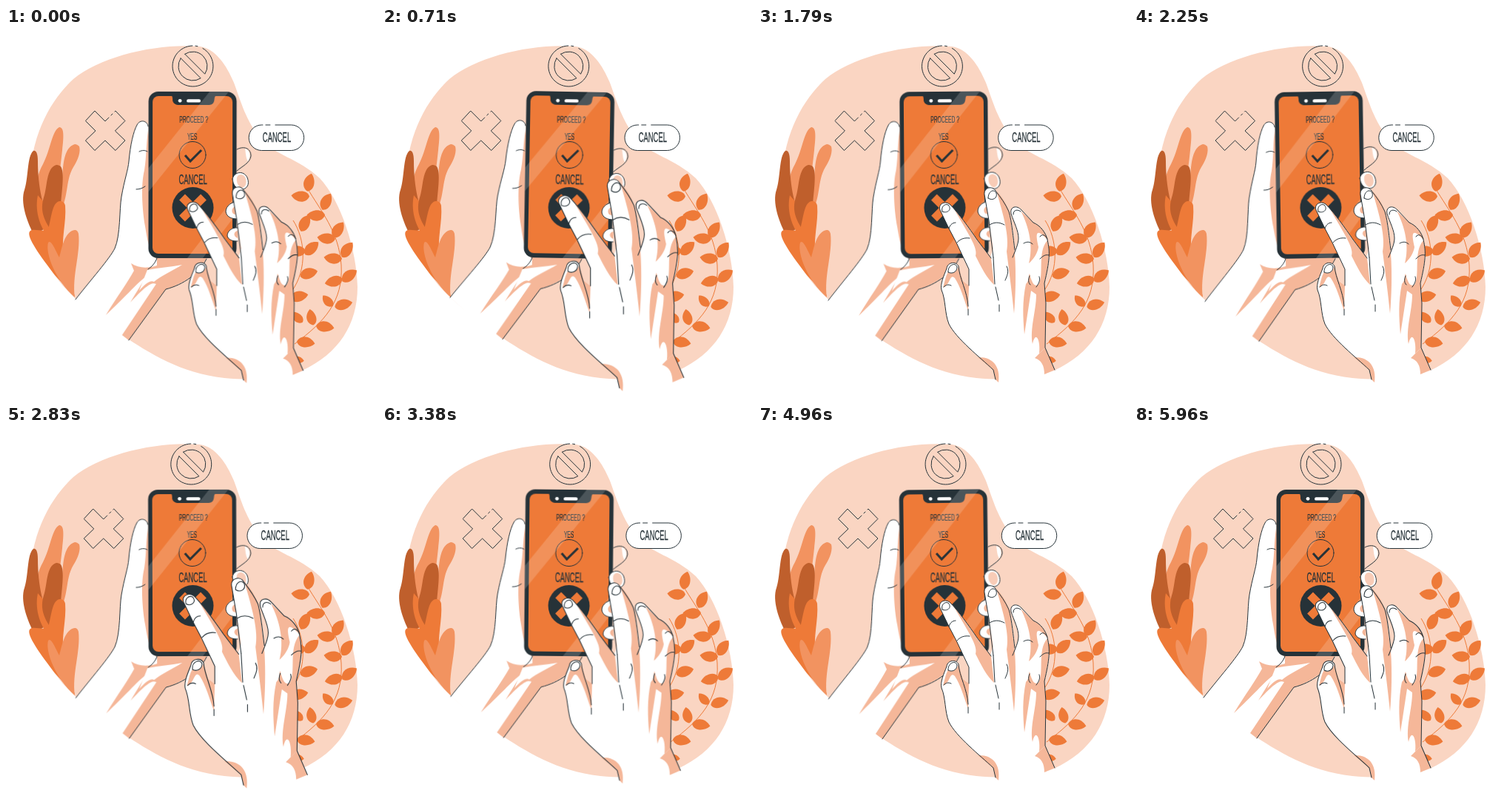
An HTML page that plays this animation: 500 px wide and 500 px high, repeating every 6 s.

```html
<!DOCTYPE html>
<html lang="en">
<head>
<meta charset="utf-8">
<title>Proceed or cancel</title>
<style>
  html, body { margin: 0; width: 100%; height: 100%; overflow: hidden; background: #fff; }
  svg { display: block; width: 100vw; height: 100vh; }

  .blob { fill: #fad5c2; }
  .orange { fill: #ee7a38; }
  .rust { fill: #bf5f2c; }
  .coral { fill: #f29360; }
  .shade { fill: #f5b799; }
  .skin { fill: #fff; }
  .dark { fill: #263238; }
  .ink { fill: none; stroke: #263238; stroke-width: 1; stroke-linecap: round; stroke-linejoin: round; }
  .skin.ink { fill: #fff; }
  .blob.ink { fill: #fad5c2; }
  .stem { fill: none; stroke: #ee7a38; stroke-width: 1; }
  .glare { fill: #fff; opacity: .17; }

  .label {
    font: 17.5px "Liberation Sans", Arial, sans-serif;
    fill: #263238; stroke: #263238; stroke-width: .3;
    text-anchor: middle;
    transform: scaleX(.54); transform-box: fill-box; transform-origin: center;
  }
  .small { font-size: 12.4px; stroke-width: .25; }

  .sway, .pulse, .shake { animation: 6s linear -.04s infinite; }
  .sway { animation-name: sway; animation-duration: 3s; transform-origin: 250px 250px; }
  .pulse { animation-name: pulse; transform-origin: 322px 344px; }
  .shake { animation-name: shake; }

  @keyframes sway {
    25% { transform: rotate(1deg); }
    75% { transform: rotate(-1deg); }
  }
  @keyframes pulse {
    0%, 30%, 40%, 60%, 100% { transform: scale(1); }
    10%, 50% { transform: scale(1.1); }
  }
  @keyframes shake {
    0%, 100% { transform: translateX(0); }
    10%, 90% { transform: translateX(-1px); }
    20%, 80% { transform: translateX(2px); }
    30%, 50%, 70% { transform: translateX(-4px); }
    40%, 60% { transform: translateX(4px); }
  }
</style>
</head>
<body>
<svg viewBox="0 0 500 500">
  <defs>
    <path id="leaf" class="orange" d="M-12 1C-9 -9 4 -11 12.500 -1C6 8 -8 10 -12 1Z"/>
    <clipPath id="case"><rect x="192.5" y="86" width="119" height="225" rx="13"/></clipPath>
  </defs>

  <path class="blob" d="M262 25C283 28 298 50 308 74C318 101 324 125 345 151C362 171 395 176 424 203C453 234 474 300 475 350C475 400 450 440 400 463C365 476 330 476 295 473C235 466 195 440 157 415C122 389 90 367 68 337C40 300 28 255 32 200C37 140 60 98 91 69C128 38 205 20 262 25Z"/>

  <!-- foliage, left -->
  <g>
    <path class="coral" d="M72 134C62 139 60 165 50 184C37 207 38 232 50 262L72 240C68 220 73 195 76 165C78 148 79 134 72 134Z"/>
    <path class="rust" d="M37 166C28 173 31 203 24 222C20 240 30 265 38 280L62 265C50 245 43 215 43 180C43 170 41 165 37 166Z"/>
    <path class="coral" d="M93 157C79 161 77 182 76 205C74 222 66 238 70 252C86 232 79 208 91 188C98 177 101 167 99 160C97 158 95 157 93 157Z"/>
    <path class="orange" d="M43 226C38 250 48 272 58 284L70 250C60 240 52 238 43 226Z"/>
    <path class="rust" d="M68 185C54 189 56 215 51 229C45 248 53 262 62 275L74 240C75 222 79 200 75 189C74 186 71 185 68 185Z"/>
    <path class="orange" d="M73 234C63 235 62 252 58 268C57 280 36 268 32 275C27 282 47 309 66 334L93 363L78 310C74 285 82 262 80 240C79 235 76 234 73 234Z"/>
    <path class="coral" d="M93 273C79 275 76 296 72 310C66 299 61 285 57 290C53 304 66 340 93 364C89 334 101 305 98 278C97 274 95 273 93 273Z"/>
  </g>

  <!-- vines, right -->
  <g>
    <path class="stem" d="M390 427C430 397 456 370 453 320C450 275 425 247 407 216"/>
    <path class="stem" d="M388 260C404 285 408 325 386 356"/>
    <use href="#leaf" transform="translate(410 209) rotate(-72)"/>
    <use href="#leaf" transform="translate(398 227) rotate(-172)"/>
    <use href="#leaf" transform="translate(433 235) rotate(-58)"/>
    <use href="#leaf" transform="translate(419 253) rotate(-175)"/>
    <use href="#leaf" transform="translate(404 264) rotate(-58)"/>
    <use href="#leaf" transform="translate(449 273) rotate(-52)"/>
    <use href="#leaf" transform="translate(433 284) rotate(-170)"/>
    <use href="#leaf" transform="translate(413 298) rotate(-38)"/>
    <use href="#leaf" transform="translate(393 301) rotate(-170)"/>
    <use href="#leaf" transform="translate(461 300) rotate(-50)"/>
    <use href="#leaf" transform="translate(442 311) rotate(-170)"/>
    <use href="#leaf" transform="translate(409 332) rotate(-12)"/>
    <use href="#leaf" transform="translate(464 335) rotate(-32)"/>
    <use href="#leaf" transform="translate(443 342) rotate(170)"/>
    <use href="#leaf" transform="translate(396 363) rotate(-8)"/>
    <use href="#leaf" transform="translate(456 374) rotate(-10)"/>
    <use href="#leaf" transform="translate(435 369) rotate(-128) scale(.8)"/>
    <use href="#leaf" transform="translate(431 404) rotate(12)"/>
    <use href="#leaf" transform="translate(413 391) rotate(-98) scale(.9)"/>
    <use href="#leaf" transform="translate(405 425) rotate(12)"/>
    <use href="#leaf" transform="translate(394 391) rotate(-130) scale(.8)"/>
    <use href="#leaf" transform="translate(394 449) rotate(10) scale(.7)"/>
  </g>

  <!-- phone and the hand that holds it -->
  <g class="sway">
    <path class="skin" d="M94 367C115 340 140 312 147 298C155 280 153 245 156 228C160 205 165 192 166 180C168 158 172 140 177 131C181 123 191 125 192 133L200 300H272C264 328 240 346 216 353L165 423L150 416Z"/>
    <path class="shade" d="M192 138C189 160 190 172 187 192C182 212 184 245 188 268C191 285 192 298 203 312L210 300Z"/>
    <path class="shade" d="M169 318C179 325 192 325 204 321V308H272C264 328 240 346 216 353L166 422L157 415L203 346C196 343 188 350 168 371C176 357 183 347 189 336C176 346 160 365 135 388C151 362 165 343 173 328Z"/>
    <path class="skin" d="M191 327C207 324 222 323 238 320C225 328 211 334 200 343C195 340 187 347 180 355Z"/>
    <path class="ink" d="M94 367C115 340 140 312 147 298C155 280 153 245 156 228C160 205 165 192 166 180C168 158 172 140 177 131C181 123 191 125 192 133M180 167C184 165 188 165 191 167M176 218C180 218 184 217 188 214M192 326C198 322 202 317 204 311M166 422L216 353C240 347 262 331 271 312"/>

    <rect class="dark" x="192.5" y="86" width="119" height="225" rx="13"/>
    <rect class="orange" x="198" y="92" width="108" height="213" rx="8"/>
    <path class="dark" d="M223 91H284C281 93 282 96 281 99C280 103 277 104 273 104H234C229 104 226 102 225 98C225 95 225 92 223 91Z"/>
    <circle class="skin" cx="235" cy="98.3" r="2.4"/>
    <rect class="skin" x="244" y="96.2" width="19" height="4.4" rx="2.2"/>
    <text class="label small" x="253.5" y="128">PROCEED ?</text>
    <text class="label small" x="251.5" y="151">YES</text>
    <circle class="ink" cx="252" cy="171.5" r="18"/>
    <path class="ink" d="M242 172L249 180L264 165" style="stroke-width:3;stroke-linecap:butt;stroke-linejoin:miter"/>
    <text class="label" x="252.5" y="211.5">CANCEL</text>
    <circle class="dark" cx="252.5" cy="243" r="28"/>
    <path d="M238 228.500L267 257.500M267 228.500L238 257.500" stroke="#ee7a38" stroke-width="11"/>
    <g clip-path="url(#case)">
      <path class="glare" d="M275 86H301L192 222V190Z"/>
      <path class="glare" d="M312 224V250L266 311H245Z"/>
    </g>

    <!-- fingertips wrapped round the edge -->
    <path class="blob ink" d="M312 164C321 159 331 162 331 173C329 183 320 186 312 193"/>
    <path class="skin" d="M323 163C330 165 331 174 327 180C324 176 324 169 323 163Z"/>
    <path class="skin ink" d="M306 204C308 194 321 192 326 202C330 212 325 218 318 218C311 217 307 213 306 204Z"/>
    <path class="shade" d="M312 202C314 196 322 197 324 204C326 212 322 216 318 216C313 213 311 208 312 202Z" opacity=".7"/>
    <path class="skin ink" d="M313 235C306 234 297 240 297 248C298 255 304 258 313 258"/>
    <path class="shade" d="M313 240C307 241 303 246 307 251L313 253Z"/>
    <path class="skin ink" d="M313 270C306 269 299 274 299 281C301 287 307 288 313 288"/>
    <path class="shade" d="M313 274C308 275 306 281 313 284Z"/>
  </g>

  <!-- tapping hand -->
  <g class="pulse">
    <path class="skin" d="M246 246C243 238 252 233 259 238C271 250 285 270 296 286L314 310L318 298L312 260L306 225C305 215 317 213 321 220C328 229 334 237 339 248C343 261 345 280 347 305L352 286C352 274 346 263 342 251C340 241 350 239 356 246L372 263C382 267 389 277 391 286C395 303 394 315 387 345L389 372L388 432L401 462L387 468L360 480H326L321 475L318 462C300 445 268 420 258 400C252 385 254 368 248 354C246 346 251 335 255 325C256 316 268 315 271 322L277 342L285 348V326L268 290L258 271Z"/>

    <g class="shade">
      <path d="M265 245C276 257 288 276 296 287L315 311L319 347C309 338 301 322 294 308C297 298 288 284 265 245Z"/>
      <path d="M322 220C333 231 341 246 342 264L347 305C349 332 348 362 346 386C343 356 339 326 336 302C340 282 332 254 322 220Z"/>
      <path d="M355 247L372 263C382 267 389 277 391 286L385 280C374 271 376 283 379 296C378 304 372 313 366 318C372 296 367 270 355 247Z"/>
      <path d="M391 287C395 303 393 318 387 345L389 372L388 432L380 440C382 421 375 408 371 427C367 407 376 382 376 360L369 355L360 414C358 390 357 370 362 346C367 341 365 335 367 332C370 344 373 350 379 347C387 334 377 303 391 287Z"/>
      <path d="M388 432L401 462L387 468C387 456 383 449 374 446Z"/>
      <path d="M297 445C317 444 328 457 325 479L321 475L318 462Z"/>
      <path d="M271 322L277 342L285 348L284 382C278 366 274 350 266 338C259 331 260 347 250 351C253 340 254 334 257 330C262 333 268 331 271 322Z"/>
    </g>

    <path class="ink" d="M285 348V326L268 290L258 271L246 246C243 238 252 233 259 238C271 250 285 270 296 286L315 311
      M318 310L312 260L306 225C305 215 317 213 321 220C328 229 334 237 339 248C343 261 345 285 347 300
      M344 310C348 300 352 292 352 284C352 274 346 263 342 251C340 241 350 239 356 246L372 263C382 267 389 277 391 286C395 303 394 315 387 345L389 372L388 432L401 462
      M321 475L318 462C300 445 268 420 258 400C252 385 254 368 248 354C246 346 251 335 255 325C256 316 268 315 271 322C272 338 283 356 284 376M284 380V388"/>
    <path class="ink" d="M249 248C247 242 252 237 257 239C263 246 255 251 249 248M258 271C259 267 262 263 267 263M269 290C273 285 279 283 286 284
      M311 230C311 220 319 217 322 223C324 230 317 234 311 230M313 266C319 262 326 262 333 266M318 310L320 346M321 350L325 368M326 374V383M336 322C340 329 336 336 334 341
      M345 252C345 245 351 245 355 248M359 291C364 288 368 289 371 292M381 282C384 278 388 279 391 285M381 312C386 307 389 306 393 307M367 335C365 340 365 344 368 347M380 336C382 341 379 346 376 350
      M257 330C256 320 267 316 269 323C269 330 262 333 257 330M251 350C254 347 257 346 261 348"/>
  </g>

  <!-- floating icons -->
  <g class="shake">
    <path class="ink" d="M147 113L148 112L161 125.500L147.500 139L161 152L148 165.500L134 152L120 165.500L107.500 152L121 139L107.500 125.500L120 112L134 126L139 121M142 118L144 116"/>
    <path class="ink" d="M266 27.500A27.500 27.500 0 1 1 252 24M256 24.200L259 24.700M241.800 35.200L268.800 62.200A19.500 19.500 0 0 0 241.800 35.200M236.200 40.800L263.200 67.800A19.500 19.500 0 0 1 236.200 40.800"/>
    <path class="ink skin" d="M364 131H385.500A17.250 17.250 0 0 1 385.500 165.500H345.500A17.250 17.250 0 0 1 345.500 131H347M351 131H357"/>
    <text class="label" x="366" y="154.300">CANCEL</text>
  </g>
</svg>
</body>
</html>
```
